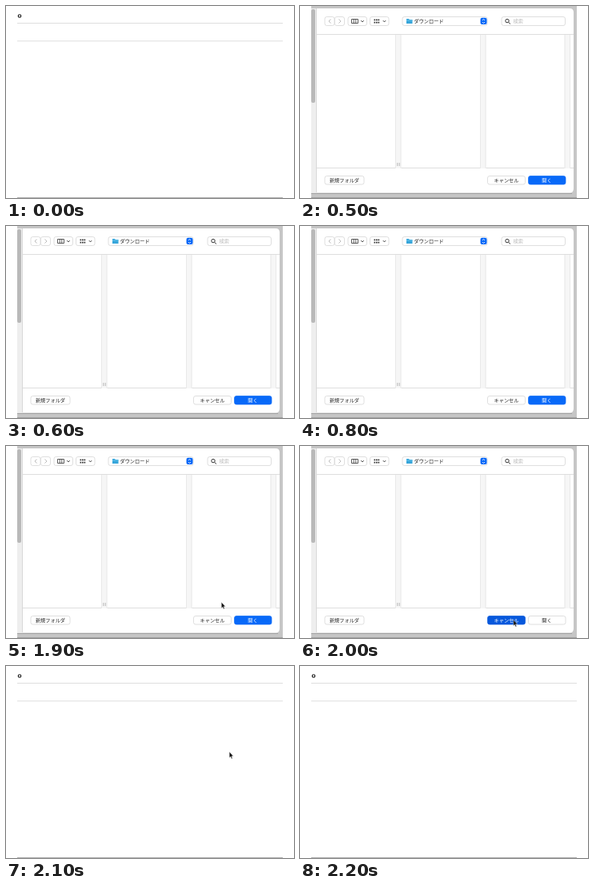
Animation of 360 by 240 pixels, one loop 2.4 s. Source, as an HTML page:

```html
<!DOCTYPE html>
<html lang="ja">
<head>
<meta charset="utf-8">
<title>File dialog</title>
<style>
  html, body { margin: 0; width: 100%; height: 100%; overflow: hidden; background: #fff; }
  svg { display: block; width: 100%; height: 100%; }
  text { font: 500 6.2px "Noto Sans CJK JP", "Noto Sans CJK", sans-serif; fill: #222; }
  .button { fill: #fff; stroke: #d2d2d2; stroke-width: .7; }
  .line { fill: none; stroke: #333; stroke-width: 1; }
  .thin { stroke-width: .8; }
  .pale { stroke: #bbb; }
  .hint { fill: #bbb; }
  .primary rect { fill: #0869f8; stroke: #0869f8; }
  .primary text { fill: #fff; }
  .pressed rect { fill: #0758dc; stroke: #0758dc; }
</style>
</head>
<body>
<svg viewBox="0 0 360 240">
  <defs>
    <path id="chevron" class="line" d="M-1.6 -.8L0 .9L1.6 -.8"/>
    <g id="scroller">
      <rect width="7.5" height="167" fill="#f6f6f6"/>
      <path d="M.5 0V167M7 0V167" stroke="#e6e6e6" stroke-width=".8"/>
    </g>
  </defs>

  <g id="page">
    <circle cx="17" cy="12.5" r="1.75" fill="none" stroke="#222" stroke-width="1.2"/>
    <path d="M14 21.5H346M14 43.8H346" stroke="#dedede"/>
    <path d="M14 239.5H346" stroke="#b2b2b2"/>
  </g>

  <g id="dialog">
    <rect x="14" width="332" height="240" fill="#c6c6c6"/>
    <path d="M14 234.5H340M14 239.5H346" stroke="#a2a2a2"/>
    <path d="M14 3H337Q342 3 342 8V228Q342 233.5 337 233.5H14Z" fill="#fff"/>
    <rect x="14" y="3" width="6.5" height="230.5" fill="#eee"/>
    <rect x="14" y="4" width="5" height="117" rx="2" fill="#b9b9b9"/>
    <path d="M20.5 3V233" stroke="#d8d8d8"/>
    <path d="M21 35.5H342M21 202.5H342" stroke="#dedede"/>
    <use href="#scroller" x="119" y="36"/>
    <use href="#scroller" x="225" y="36"/>
    <use href="#scroller" x="330.5" y="36"/>
    <path d="M121.8 196V200M124.2 196V200" stroke="#aaa" stroke-width=".8"/>

    <rect class="button" x="31" y="13.5" width="12" height="11" rx="2.5"/>
    <rect class="button" x="43.5" y="13.5" width="12" height="11" rx="2.5"/>
    <path class="line pale" d="M38.5 16.5L36 19L38.5 21.5M48.5 16.5L51 19L48.5 21.5"/>

    <rect class="button" x="60" y="13.5" width="23.5" height="11" rx="2.5"/>
    <path class="line thin" d="M64.5 16.5H72.5V21.5H64.5ZM67.2 16.5V21.5M69.8 16.5V21.5"/>
    <use href="#chevron" x="78" y="19"/>
    <rect class="button" x="87.5" y="13.5" width="23.5" height="11" rx="2.5"/>
    <path d="M92.5 17.3H99.2M92.5 20.7H99.2" stroke="#333" stroke-width="1.7" stroke-dasharray="1.7 .8"/>
    <use href="#chevron" x="105.5" y="19"/>

    <rect class="button" x="128" y="13.5" width="106" height="11" rx="2.5"/>
    <path d="M133 16H136L137 17H140.5V22H133Z" fill="#36a5da"/>
    <path d="M133 18H140.5" stroke="#78cdef" stroke-width=".8"/>
    <text x="142.5" y="20.9">ダウンロード</text>
    <rect x="225.5" y="14.8" width="8" height="8.3" rx="2" fill="#0869f8"/>
    <path d="M228 18L229.5 16.5L231 18M228 20L229.5 21.5L231 20" fill="none" stroke="#fff" stroke-width=".9"/>

    <rect class="button" x="252" y="13.5" width="79.5" height="11" rx="2.5"/>
    <path class="line" d="M260.8 20.5L263 22.5"/>
    <circle class="line" cx="259" cy="18.6" r="2.2"/>
    <text class="hint" x="266.5" y="20.9">検索</text>

    <g text-anchor="middle">
      <g><rect class="button" x="31" y="212.5" width="49" height="10.5" rx="2.5"/><text x="55.5" y="220">新規フォルダ</text></g>
      <g id="cancel"><rect class="button" x="234.5" y="212.5" width="47" height="10.5" rx="2.5"/><text x="258" y="220">キャンセル</text></g>
      <g id="open"><rect class="button" x="285.5" y="212.5" width="46.5" height="10.5" rx="2.5"/><text x="308.5" y="220">開く</text></g>
    </g>
  </g>

  <path id="beam" class="line" d="M-1.8 -4Q0 -4 0 -2.8Q0 -4 1.8 -4M0 -3V3M-1.8 4Q0 4 0 2.8Q0 4 1.8 4"/>
  <path id="arrow" d="M0 0V7.4L1.6 5.9L2.7 8.6L3.9 8.1L2.8 5.4H5Z" fill="#111" stroke="#fff" stroke-width=".4"/>
</svg>
<script>
const LOOP = 2400, STEP = 100;
const part = id => document.getElementById(id);
const show = (id, visible) => part(id).style.display = visible ? "" : "none";
const place = (id, x, y) => part(id).setAttribute("transform", `translate(${x} ${y})`);
const mix = (a, b, p) => a + (b - a) * p;

function draw(now) {
  const time = Math.floor(now % LOOP / STEP) * STEP;
  const dialogOpen = time >= 500 && time < 2100;
  const pressed = time === 2000;

  show("page", !dialogOpen);
  show("dialog", dialogOpen);
  part("cancel").setAttribute("class", pressed ? "primary pressed" : "");
  part("open").setAttribute("class", pressed ? "" : "primary");

  show("beam", time === 1700);
  show("arrow", time >= 1800 && time < 2200);
  place("beam", 289, 19.5);
  if (time <= 2000) {
    const rest = Math.max(0, 2000 - time) / 300;
    const travel = 1 - rest * rest;
    place("arrow", mix(289, 266.8, travel), mix(19, 217.3, travel));
  } else {
    place("arrow", 279.2, 107.3);
  }
}

const start = performance.now();
function tick() {
  draw(performance.now() - start);
  requestAnimationFrame(tick);
}
tick();
</script>
</body>
</html>
```
